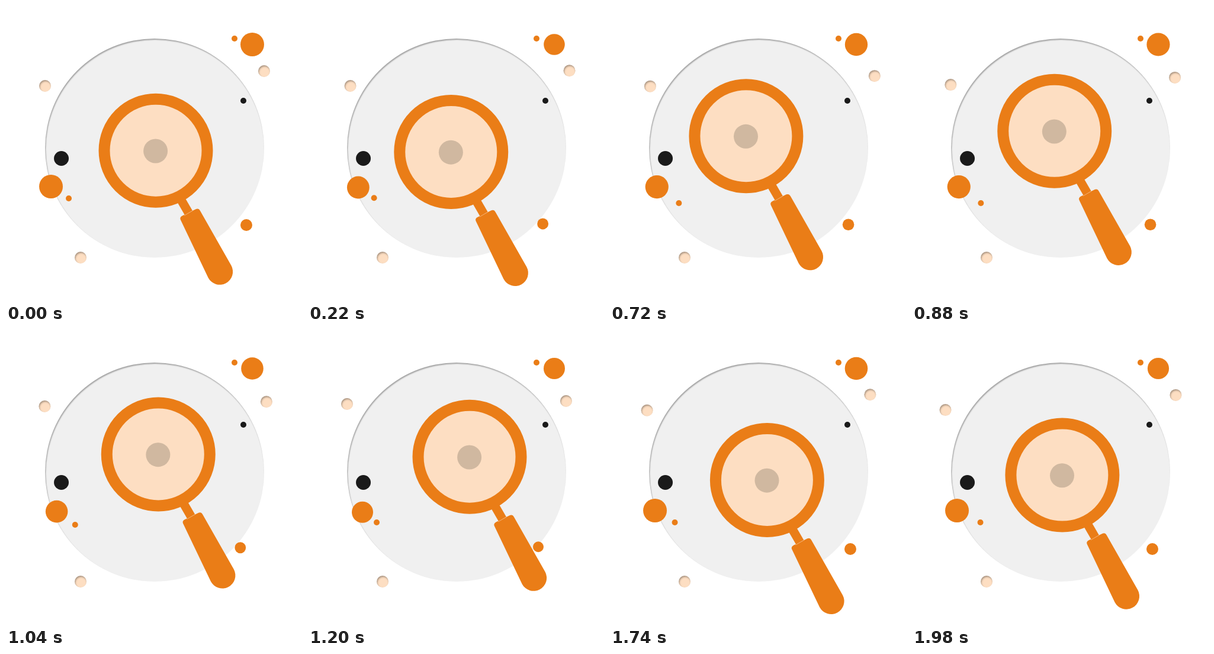
An HTML page for the animation above (2000 ms loop, 500 by 500 pixels).

```html
<!DOCTYPE html>
<html lang="en">
<head>
<meta charset="utf-8">
<title>Search</title>
<style>
  html, body { margin: 0; width: 100%; height: 100%; overflow: hidden; background: #fff; }
  #stage { position: relative; width: 500px; height: 500px; overflow: hidden; }
  #stage svg { position: absolute; left: 0; top: 0; }
  .disc { position: absolute; border-radius: 50%; }
  .plate { left: 66px; top: 55px; width: 370px; height: 370px; background: #f0f0f0;
    box-shadow: inset 1px 2px 2px rgba(0, 0, 0, .32); }
  .pearl { width: 20px; height: 20px; background: #fddec2;
    box-shadow: inset 1px 2px 3px rgba(0, 0, 0, .34); }
  .orange { fill: #ea7d17; }
  .black { fill: #1a1a1a; }
</style>
</head>
<body>
<div id="stage">
  <div class="disc plate"></div>
  <div class="disc pearl" id="pearlLeft" style="left:56px;top:125px"></div>
  <div class="disc pearl" id="pearlRight" style="left:426px;top:100px"></div>
  <div class="disc pearl" style="left:116px;top:415px"></div>
  <svg width="500" height="500" viewBox="0 0 500 500">
    <g class="black">
      <circle cx="93.5" cy="257.5" r="12.5"/>
      <circle cx="401" cy="160" r="5"/>
    </g>
    <g class="orange">
      <circle cx="386" cy="55" r="5"/>
      <circle id="big" cx="416" cy="65" r="20"/>
      <circle id="small" cx="106" cy="325" r="5"/>
      <g id="pair">
        <circle cx="76" cy="305" r="20"/>
        <circle cx="406" cy="370" r="10"/>
      </g>
    </g>
    <g id="lens">
      <path d="M292 321L308.5 349.5" stroke="#ea7d17" stroke-width="15"/>
      <path class="orange" d="M297.5 354.5L321 343Q325.5 341.3 328 346L380.6 438.5A22 22 0 0 1 341.7 459.2L294.8 361Q293 357 297.5 354.5Z"/>
      <path d="M301 354L315.5 345.6" stroke="#f5be8b" stroke-width=".8"/>
      <circle cx="253" cy="244.3" r="87" fill="#fddec2" stroke="#ea7d17" stroke-width="19"/>
      <circle cx="252.6" cy="245" r="20.5" fill="#d0b8a0"/>
    </g>
  </svg>
</div>
<script>
const LOOP = 2000, STEP = 400, TICK = 20;
const $ = id => document.getElementById(id);

// Offsets at every STEP, joined by smooth curves
const moves = {
  lens: [[0, 0], [-20, 0], [-20, -30], [20, -30], [20, 10], [0, 0]],
  pearlLeft: [[0, 0], [10, 0], [0, 0], [0, -10], [0, 0], [-10, 0]],
  pearlRight: [[0, 0], [10, 0], [10, 10], [0, 10], [0, 0], [10, 0]],
  small: [[0, 0], [10, 0], [10, 10], [10, 0], [0, 0], [10, 0]]
};

// Scale at every STEP around a fixed centre
const pulses = {
  big: { at: [416, 65], keys: [1, .8, 1, .9, 1, .9] },
  pair: { at: [236, 332.5], keys: [1, .9, 1, .9, 1, 1] }
};

function tangent(keys, i) {
  if (i === 0 || i === keys.length - 1) return [0, 0];
  return [0, 1].map(k => (keys[i + 1][k] - keys[i - 1][k]) / 6);
}

function curves(keys) {
  return keys.slice(1).map((b, i) => {
    const a = keys[i], ta = tangent(keys, i), tb = tangent(keys, i + 1);
    const path = document.createElementNS("http://www.w3.org/2000/svg", "path");
    path.setAttribute("d",
      `M${a} C${a[0] + ta[0]},${a[1] + ta[1]} ${b[0] - tb[0]},${b[1] - tb[1]} ${b}`);
    return { path, length: path.getTotalLength() };
  });
}

const movers = Object.entries(moves).map(([id, keys]) => ({ el: $(id), parts: curves(keys) }));
const start = performance.now();

function draw(t) {
  const i = Math.floor(t / STEP), u = t / STEP - i;
  for (const { el, parts } of movers) {
    const { path, length } = parts[i];
    const p = path.getPointAtLength(length * u);
    el.style.transform = `translate(${p.x}px, ${p.y}px)`;
  }
  for (const id in pulses) {
    const { at: [x, y], keys } = pulses[id];
    const s = keys[i] + (keys[i + 1] - keys[i]) * u;
    $(id).setAttribute("transform", `translate(${x} ${y}) scale(${s}) translate(${-x} ${-y})`);
  }
}

function frame() {
  const t = (performance.now() - start) % LOOP;
  draw(Math.floor(t / TICK) * TICK);
  requestAnimationFrame(frame);
}

draw(0);
requestAnimationFrame(frame);
</script>
</body>
</html>
```
